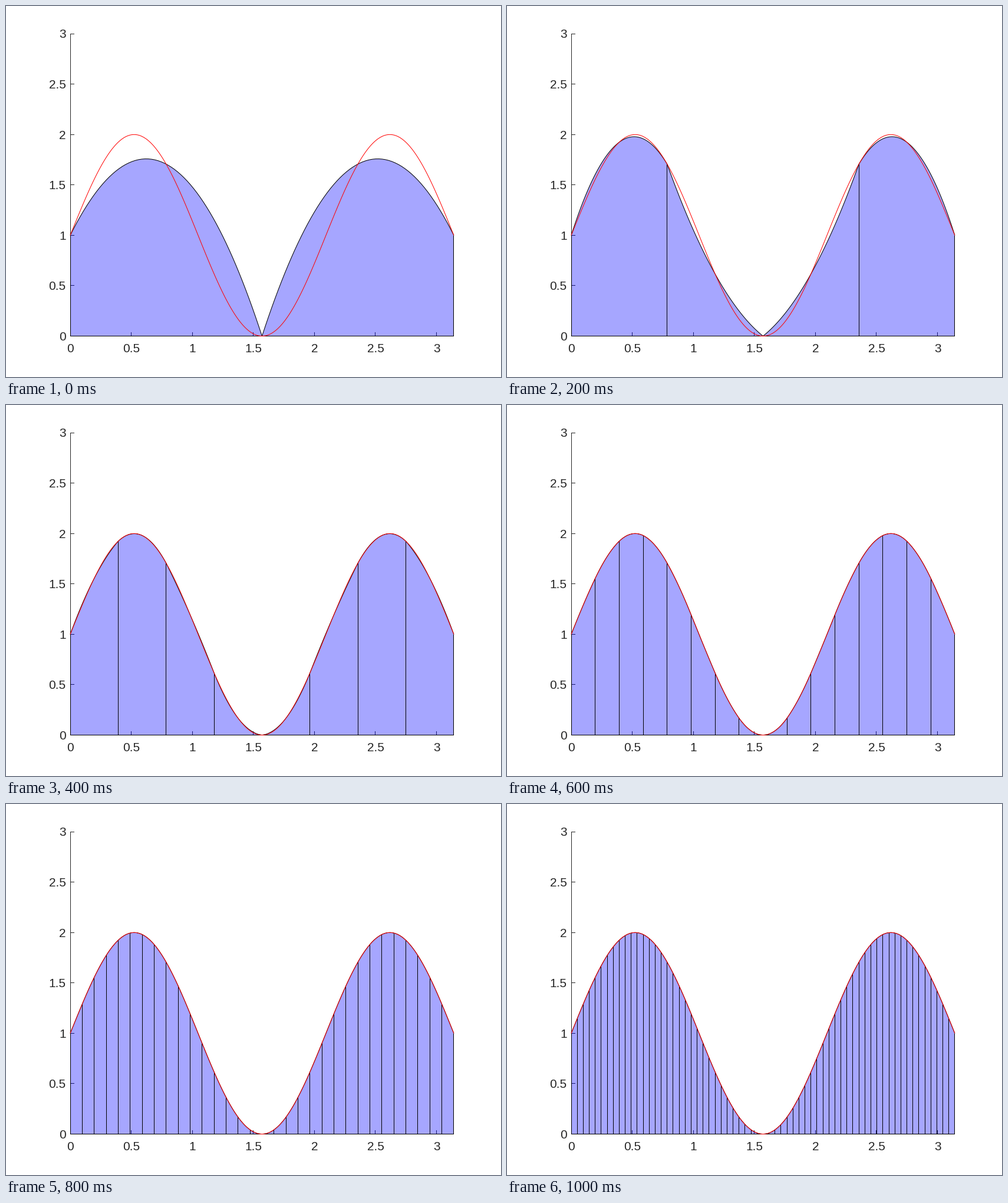
Recreate the animation shown at these times as a matplotlib script. Size 840 by 630 pixels, loop 1200 ms.

```python
import numpy as np
import matplotlib.pyplot as plt
from matplotlib.animation import FuncAnimation

WIDTH, HEIGHT, DPI = 840, 630, 150
LEFT, BASE = 109.0, 560.5            # pixel position of the plot's zero point
X_SCALE, Y_SCALE = 650.9 / np.pi, 171.1
PIXEL = 72 / DPI                     # one pixel in points
AXIS_GRAY = "#262626"
TICK = 6.5

plt.rcParams["font.family"] = "Liberation Sans"
plt.rcParams["path.simplify"] = False

fig = plt.figure(figsize=(WIDTH / DPI, HEIGHT / DPI), dpi=DPI, facecolor="white")
ax = fig.add_axes([0, 0, 1, 1])
ax.set_xlim(0, WIDTH)
ax.set_ylim(HEIGHT, 0)
ax.axis("off")


def func(x):
    return 1 + np.sin(3 * x)


def px(x):
    return LEFT + X_SCALE * np.asarray(x)


def py(y):
    return BASE - Y_SCALE * np.asarray(y)


def crisp(value):
    """Centre of the pixel that holds the value."""
    return np.floor(value) + 0.5


def stroke(xs, ys, color, z):
    line, = ax.plot(xs, ys, color=color, lw=PIXEL, snap=False, zorder=z,
                    solid_capstyle="butt", solid_joinstyle="miter")
    return line


def draw_axes():
    x0, x1 = crisp(px(0)), crisp(px(np.pi) - 0.01)
    y0, y1 = crisp(py(0)), crisp(py(3))
    stroke([x0, x0], [y0 + 0.5, y1 - 0.5], AXIS_GRAY, 1)
    stroke([x0 - 0.5, x1 + 0.5], [y0, y0], AXIS_GRAY, 1)
    for value in np.arange(0, 3.1, 0.5):
        x, y = crisp(px(value)), crisp(py(value))
        stroke([x, x], [y0, y0 - TICK], AXIS_GRAY, 1)
        stroke([x0, x0 + TICK], [y, y], AXIS_GRAY, 1)
        style = dict(fontsize=10, color=AXIS_GRAY, va="baseline")
        ax.text(px(value), 588, f"{value:g}", ha="center", **style)
        ax.text(101.5, py(value) + 7.3, f"{value:g}", ha="right", **style)


def simpson_arc(a, b):
    """Parabola through the function at both ends and the middle."""
    t = np.linspace(0, 1, 60)
    start, middle, end = func(a), func((a + b) / 2), func(b)
    y = (start * (1 - t) * (1 - 2 * t) + 4 * middle * t * (1 - t)
         + end * t * (2 * t - 1))
    return a + (b - a) * t, y


draw_axes()
area, = ax.fill([0, 1, 1], [0, 0, 1], facecolor=(0, 0, 1, 0.35),
                edgecolor="none", lw=0, snap=False, zorder=2)
top = stroke([], [], "black", 3)
walls = stroke([], [], "black", 3)
stroke([LEFT, crisp(px(np.pi) - 0.01) + 0.5], [crisp(BASE)] * 2, "black", 3)
grid = np.linspace(0, np.pi, 400)
stroke(px(grid), py(func(grid)), "red", 4)


def update(step):
    edges = np.linspace(0, np.pi, 2 ** (step + 1) + 1)
    arcs = [simpson_arc(a, b) for a, b in zip(edges[:-1], edges[1:])]
    xs = px(np.concatenate([x for x, _ in arcs]))
    ys = py(np.concatenate([y for _, y in arcs]))
    top.set_data(xs, ys)
    area.set_xy(np.column_stack([np.r_[xs, xs[-1], xs[0]],
                                 np.r_[ys, BASE, BASE]]))

    wall_x = crisp(px(edges) - 0.01)
    wall_x[0] = crisp(LEFT)
    gap = np.full(len(edges), np.nan)
    feet = np.full(len(edges), BASE)
    walls.set_data(np.column_stack([wall_x, wall_x, gap]).ravel(),
                   np.column_stack([feet, py(func(edges)), gap]).ravel())
    return area, top, walls


anim = FuncAnimation(fig, update, frames=6, interval=200, repeat=True,
                     repeat_delay=0, blit=False)
plt.show()
```
